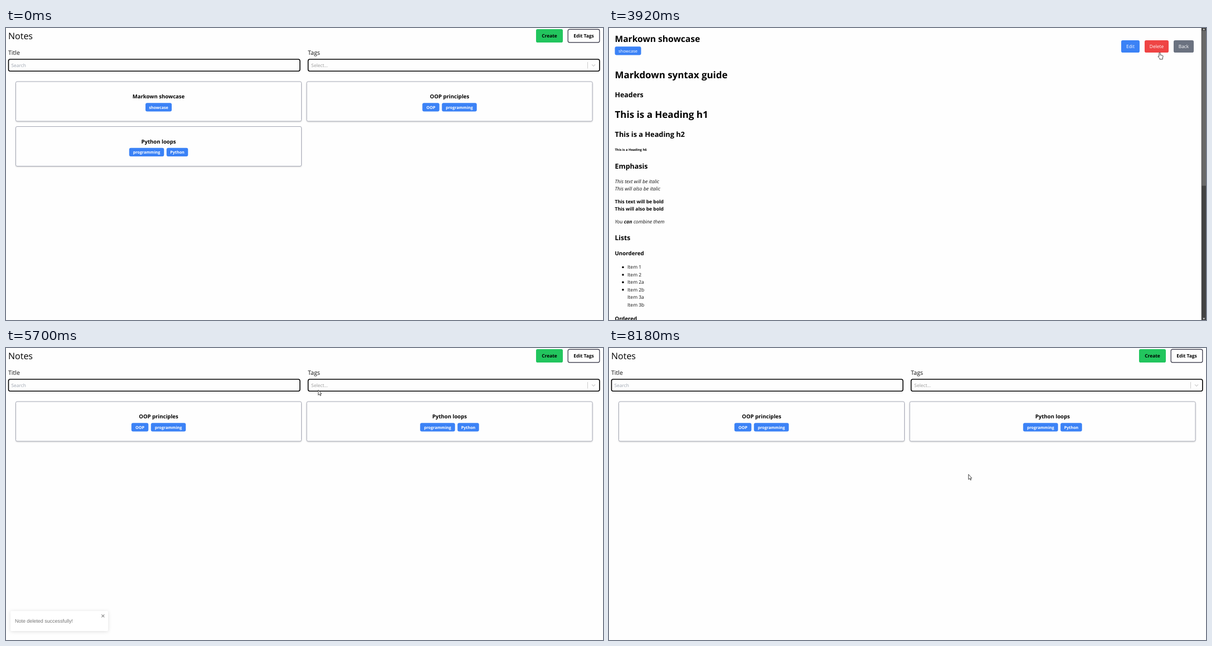
An HTML page for the animation above (8.91 s loop, 1070 by 523 pixels).

```html
<!DOCTYPE html>
<html lang="en">
<head>
<meta charset="utf-8">
<title>Notes</title>
<style>
html, body { margin: 0; width: 100%; height: 100%; overflow: hidden; background: #fefefe; }
svg { display: block; width: 1070px; height: 523px; }
text { font-family: "Open Sans", "Noto Sans", sans-serif; text-rendering: geometricPrecision; white-space: pre; }
.b { font-weight: 700; }
.i { font-style: italic; }
.card { fill: #fefefe; stroke: #a5a8b5; filter: drop-shadow(0 1px 1px rgba(0,0,0,.16)); }
.card.hover { stroke: #74a7f8; filter: drop-shadow(0 4px 4px rgba(0,0,0,.13)); }
.box { fill: #fefefe; stroke: #000; stroke-width: 1.6; }
#toast rect { fill: #fff; filter: drop-shadow(0 1px 3px rgba(0,0,0,.13)); }
#toast text { font-family: "Liberation Sans", Arial, sans-serif; }
#arrow, #hand { fill: #fff; stroke: #333; stroke-width: .9; stroke-linejoin: round; }
</style>
</head>
<body>
<svg id="stage" viewBox="0 0 1070 523"></svg>
<script>
const LOOP = 8910, OPEN_NOTE = 2050, DELETE_NOTE = 4190;
const BLUE = '#3b82f6', RED = '#ef4444';
const TAG_WIDTH = { showcase: 47, OOP: 30.5, programming: 62.5, Python: 38.5 };
const TAG_GAP = 4.5;

const text = (x, y, size, str, { cls = '', fill = '#111', mid = false } = {}) =>
  `<text x="${x}" y="${y}" font-size="${size}" class="${cls}" fill="${fill}"${mid ? ' text-anchor="middle"' : ''}>${str}</text>`;

const rect = (x, y, w, h, r, attrs) =>
  `<rect x="${x}" y="${y}" width="${w}" height="${h}" rx="${r}" ${attrs}/>`;

const button = (x, y, w, h, label, attrs, style) =>
  rect(x, y, w, h, 2.8, attrs) + text(x + w / 2, y + h / 2 + 3, 8.4, label, { mid: true, ...style });

function tag(x, y, name, cls = 'b', size = 7.2) {
  const w = TAG_WIDTH[name];
  return rect(x, y, w, 15.3, 3, `fill="${BLUE}"`) +
    text(x + w / 2, y + 10.4, size, name, { cls, fill: '#fff', mid: true });
}

function card(column, row, title, tags) {
  const left = column ? 539 : 17.5, top = 96 + row * 80.5, center = left + 256;
  let x = center - (tags.reduce((sum, t) => sum + TAG_WIDTH[t], 0) + TAG_GAP * (tags.length - 1)) / 2;
  let out = rect(left, top, 512, 71, 2.5, 'class="card"') +
    text(center, top + 30.4, 9.55, title, { cls: 'b', fill: '#000', mid: true });
  for (const t of tags) {
    out += tag(x, top + 38.2, t);
    x += TAG_WIDTH[t] + TAG_GAP;
  }
  return out;
}

const header = () =>
  text(4, 19.7, 16, 'Notes', { fill: '#000' }) +
  button(950, 2, 48, 24, 'Create', 'fill="#22c55e"', { cls: 'b', fill: '#000' }) +
  button(1007.2, 2.4, 56.6, 23.4, 'Edit Tags', 'fill="#fefefe" stroke="#2b2b3c" stroke-width="1.2"', { cls: 'b', fill: '#000' }) +
  text(4, 47.7, 10.6, 'Title') + text(541, 47.7, 10.6, 'Tags') +
  rect(4.5, 56, 522.3, 21.2, 3, 'class="box"') + rect(541.5, 56, 522.3, 21.2, 3, 'class="box"') +
  text(9.5, 70.4, 8.4, 'Search', { fill: '#9ca3af' }) +
  text(547, 69.8, 8.45, 'Select...', { fill: '#999' }) +
  '<path d="M1042.5 61V72.5" stroke="#ccc"/><path d="M1050 65.3l3 3 3-3" fill="none" stroke="#ccc" stroke-width="1.2"/>';

function notePage() {
  const bold = [
    [25, 15.6, 'Markown showcase'], [90, 16.9, 'Markdown syntax guide'], [124, 12.4, 'Headers'],
    [161, 17, 'This is a Heading h1'], [195, 12.75, 'This is a Heading h2'], [220.2, 5.8, 'This is a Heading h6'],
    [252, 12.45, 'Emphasis'], [314, 8.5, 'This text will be bold'], [327.4, 8.5, 'This will also be bold'],
    [379.7, 12.1, 'Lists'], [406.6, 9.75, 'Unordered'], [523.6, 9.65, 'Ordered']
  ];
  const italic = [
    [278, 'This text will be italic'], [291.4, 'This will also be italic'],
    [349.7, 'You <tspan class="b">can</tspan> combine them']
  ];
  const items = ['1', '2', '2a', '2b', '3a', '3b'];
  return bold.map(([y, size, s]) => text(10.5, y, size, s, { cls: 'b', fill: '#000' })).join('') +
    italic.map(([y, s]) => text(10.5, y, 8.8, s, { cls: 'i' })).join('') +
    items.map((n, i) => {
      const y = 431.3 + 13.45 * i;
      return text(33, y, 8.5, 'Item ' + n) + (i < 4 ? `<circle cx="25" cy="${y - 2.8}" r="1.8"/>` : '');
    }).join('') +
    tag(10.5, 33.3, 'showcase', '', 7.5) +
    button(918, 22, 33, 22, 'Edit', `fill="${BLUE}"`, { fill: '#fff' }) +
    button(960, 22, 43, 22, 'Delete', `id="delete" fill="${RED}"`, { fill: '#fff' }) +
    button(1012, 22, 36, 22, 'Back', 'fill="#6b7280"', { fill: '#fff' }) +
    rect(1061.7, 0, 8.3, 523, 0, 'fill="#424242"') + rect(1062.5, 5, 7.5, 277.5, 0, 'fill="#686868"') +
    '<path d="M1064 3.5l2.2-2.5 2.2 2.5zM1064 519.5l2.2 2.5 2.2-2.5z" fill="#ddd"/>';
}

document.getElementById('stage').innerHTML = `
  <g id="header">${header()}</g>
  <g id="before">${card(0, 0, 'Markown showcase', ['showcase'])}${card(1, 0, 'OOP principles', ['OOP', 'programming'])}${card(0, 1, 'Python loops', ['programming', 'Python'])}</g>
  <g id="after">${card(0, 0, 'OOP principles', ['OOP', 'programming'])}${card(1, 0, 'Python loops', ['programming', 'Python'])}</g>
  <g id="note">${notePage()}</g>
  <g id="toast">${rect(8, 471, 175, 36, 2, '')}${text(16, 491.6, 8.95, 'Note deleted successfully!', { fill: '#757575' })}
    <path d="M171.3 477.4l5 5m0-5l-5 5" stroke="#8a8a8a" stroke-width="1.2"/></g>
  <circle id="click" cx="512.3" cy="153" r="7" fill="rgba(255,255,0,.45)"/>
  <path id="arrow" d="M0 0V9.2L2.1 7.3L3.6 10.4L4.9 9.8L3.5 6.8H6Z"/>
  <path id="hand" d="M-1.1 1Q0-.6 1.1 1V4.8L4.9 5.6Q6.1 6 6 7.3L5.2 10.5V12.5H0V11.2L-3 7.8Q-2.8 6.3-1.1 7.5Z"/>`;

const el = id => document.getElementById(id);
const show = (id, on) => { el(id).style.display = on ? '' : 'none'; };
const place = (id, x, y) => el(id).setAttribute('transform', `translate(${x} ${y})`);

// time, x, y of the pointer tip
const pointerPath = [
  [70, 975, 484], [480, 705, 318], [890, 533.3, 169.7], [960, 521, 158], [1170, 512.7, 152.7],
  [2320, 512.7, 152.7], [3210, 619, 108], [3560, 800, 76], [3920, 987, 43.5], [4120, 988, 38],
  [4530, 988, 38], [4940, 928.3, 42.3], [5420, 720, 46], [5700, 560, 75], [5900, 485, 112],
  [6150, 490, 150], [6330, 543.5, 150], [6600, 690, 190], [6900, 790, 294], [7230, 783, 267], [7510, 644.3, 226.3]
];

// time, horizontal offset of the toast as it settles
const toastEntry = [[4590, 14], [4700, -5.5], [4800, 2.8], [4890, 0]];

function along(path, t) {
  const next = path.findIndex(p => p[0] > t);
  if (next < 0) return path[path.length - 1].slice(1);
  if (next === 0) return path[0].slice(1);
  const a = path[next - 1], b = path[next], k = (t - a[0]) / (b[0] - a[0]);
  return a.slice(1).map((v, i) => v + (b[i + 1] - v) * k);
}

const toastOffset = t => t < 8040 ? along(toastEntry, t)[0] : t < 8110 ? 9 : -23;

function draw(t) {
  const [x, y] = along(pointerPath, t);
  const visible = t >= 70;
  const onNote = t >= OPEN_NOTE && t < DELETE_NOTE;
  const onDelete = onNote && x > 960 && x < 1003 && y > 22 && y < 44;

  show('header', !onNote);
  show('before', t < OPEN_NOTE);
  show('after', t >= DELETE_NOTE);
  show('note', onNote);
  el('delete').setAttribute('fill', onDelete && y < 42 ? '#dc2626' : RED);

  for (const c of document.querySelectorAll('.card')) {
    const left = +c.getAttribute('x'), top = +c.getAttribute('y');
    c.classList.toggle('hover', visible && x > left && x < left + 512 && y > top && y < top + 71);
  }

  show('toast', t >= 4590 && t < 8180);
  place('toast', toastOffset(t), 0);
  el('toast').setAttribute('opacity', t < 8110 ? 1 : 0.8);

  show('click', t >= 1910 && t < OPEN_NOTE);
  show('arrow', visible && !onDelete);
  show('hand', onDelete);
  place('arrow', x, y);
  place('hand', x, y);
}

const start = performance.now();
function tick() {
  draw((performance.now() - start) % LOOP);
  requestAnimationFrame(tick);
}
tick();
</script>
</body>
</html>
```
